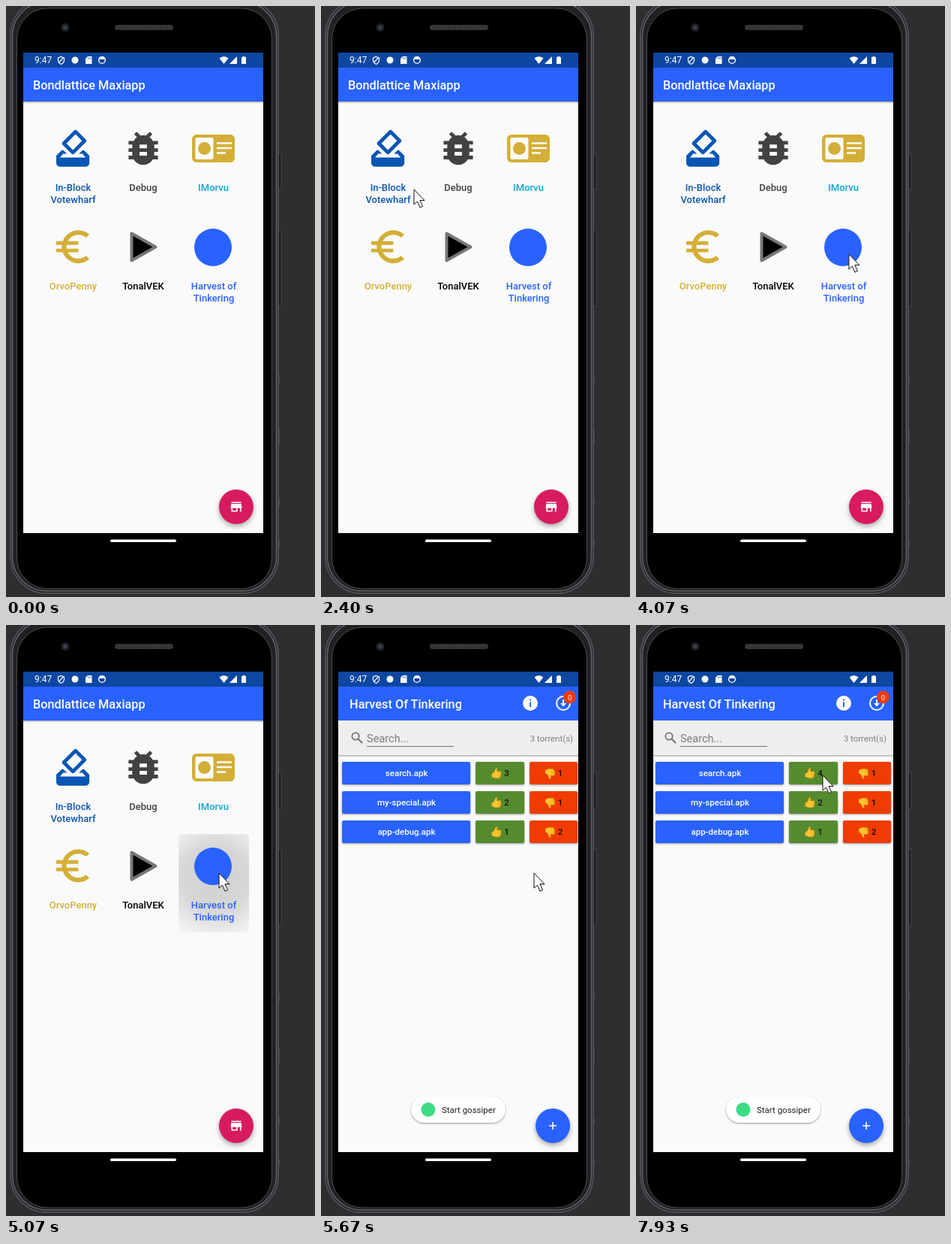
Recreate the animation shown at these times as an HTML page. Size 412x786 px, loop 8 s.

```html
<!DOCTYPE html>
<html lang="en">
<head>
<meta charset="utf-8">
<title>Phone demo</title>
<style>
  html, body { margin: 0; width: 100%; height: 100%; overflow: hidden; background: #2d2e30; }
  svg { display: block; width: 412px; height: 786px; font-family: Roboto, sans-serif; }
  .title { font-size: 16.3px; font-weight: 500; fill: #fff; }
  .label { font-size: 13px; font-weight: 500; text-anchor: middle; }
  .button { font-size: 11.5px; font-weight: 500; text-anchor: middle; }
  .lift { filter: drop-shadow(0 3px 3px #0005); }
  .low { filter: drop-shadow(0 1px 1px #0006); }
</style>
</head>
<body>
<svg viewBox="0 0 412 786">
  <defs>
    <clipPath id="screen"><path d="M23 62H343V701H23Z"/></clipPath>
    <clipPath id="voteClip"><rect x="204" y="182" width="65" height="30" rx="2"/></clipPath>
    <radialGradient id="glow" gradientUnits="userSpaceOnUse" cx="280" cy="337" r="90">
      <stop stop-opacity=".17"/><stop offset=".5" stop-opacity=".14"/><stop offset="1" stop-opacity="0"/>
    </radialGradient>
    <pattern id="mesh" width="3" height="3" patternUnits="userSpaceOnUse">
      <path d="M0 0H3V3H0Z" fill="#2e2e2e"/><path d="M0 0H1.5V1.5H0Z" fill="#4a4a4a"/>
    </pattern>
    <g id="thumb" stroke="#c88a12" stroke-width=".8" fill="#ffc52e">
      <path d="M1 13 6 10 10 1q3-1 3 2l-1 5h8q3 1 1 4 2 2 0 4 1 2-1 4 0 3-3 3H9L1 20Z"/>
      <path d="M14 12h7M14 16h7M14 20h6" fill="none"/>
    </g>
  </defs>

  <!-- phone body -->
  <path d="M363 196h4v48h-4zM363 298h4v102h-4z" fill="#1c1d1f" stroke="#46484b"/>
  <path d="M364.500 490v11M364.500 563v20M364.500 655v10M364.500 710v9" stroke="#46484b"/>
  <rect x="6" y="-9" width="357" height="790" rx="48" fill="#202123" stroke="#4b4d51" stroke-width="2"/>
  <rect x="8.500" y="-6" width="352" height="784" rx="46" fill="none" stroke="#64676c" stroke-width="1.500"/>
  <rect x="14.500" y="3" width="340" height="772" rx="41" stroke="#4a4c4f"/>
  <circle cx="79" cy="28.500" r="5.500" fill="#202226"/>
  <circle cx="79" cy="28.500" r="2.500" fill="#3a4150"/>
  <rect x="145" y="25" width="78" height="7" rx="3.500" fill="url(#mesh)"/>
  <rect x="139" y="709.500" width="88" height="3.500" rx="1.750" fill="#fff"/>

  <g clip-path="url(#screen)">
    <path d="M23 62H343V701H23Z" fill="#fafafa"/>

    <g id="home">
      <path d="M-40 82H420V127H-40Z" fill="#2962ff" class="low"/>
      <text x="36" y="111" class="title">Bondlattice Maxiapp</text>
      <rect id="cellGlow" x="230" y="278" width="94" height="131" rx="3" fill="url(#glow)"/>
      <path transform="translate(59.700 159.800) scale(2.450)" fill="#0a56b4" d="M18 13h-.68l-2 2h1.910L19 17H5l1.780-2h2.050l-2-2H6l-3 3v4c0 1.100.89 2 1.990 2H19c1.100 0 2-.89 2-2v-4l-3-3zm-1-5.050l-4.950 4.950-3.540-3.540 4.950-4.950L17 7.950zm-4.240-5.660L6.390 8.660c-.39.39-.39 1.020 0 1.410l4.950 4.950c.39.39 1.020.39 1.410 0l6.360-6.360c.39-.39.39-1.020 0-1.410L14.160 2.300c-.38-.4-1.010-.4-1.400-.01z"/>
      <path transform="translate(153.600 159.800) scale(2.450)" fill="#424242" d="M20 8h-2.810c-.45-.78-1.070-1.450-1.820-1.960L17 4.410 15.590 3l-2.170 2.170C12.960 5.060 12.490 5 12 5c-.49 0-.96.06-1.410.17L8.410 3 7 4.410l1.620 1.630C7.880 6.550 7.260 7.220 6.810 8H4v2h2.090c-.05.33-.09.66-.09 1v1H4v2h2v1c0 .34.04.67.09 1H4v2h2.810c1.040 1.790 2.970 3 5.190 3s4.150-1.210 5.190-3H20v-2h-2.090c.05-.33.09-.66.09-1v-1h2v-2h-2v-1c0-.34-.04-.67-.09-1H20V8zm-6 8h-4v-2h4v2zm0-4h-4v-2h4v2z"/>
      <rect x="248" y="171" width="57" height="37" rx="6" fill="#d4af37"/>
      <rect x="252.500" y="175" width="24" height="29" rx="2" fill="#fafafa"/>
      <circle cx="264.500" cy="189.500" r="8.500" fill="#d4af37"/>
      <path d="M281 182.500h20M281 189h20M281 195.500h12" stroke="#fafafa" stroke-width="2.500"/>
      <path transform="translate(59.700 290.800) scale(2.450)" fill="#d4af37" d="M15 18.500c-2.510 0-4.680-1.420-5.760-3.500H15v-2H8.580c-.05-.33-.08-.66-.08-1s.03-.67.08-1H15V9H9.240C10.320 6.920 12.500 5.500 15 5.500c1.610 0 3.090.59 4.230 1.570L21 5.300C19.410 3.870 17.300 3 15 3c-3.920 0-7.240 2.510-8.480 6H3v2h3.060c-.04.33-.06.66-.06 1s.02.67.06 1H3v2h3.520c1.240 3.490 4.560 6 8.480 6 2.310 0 4.410-.87 6-2.300l-1.780-1.770c-1.130.98-2.600 1.570-4.220 1.570z"/>
      <path d="M167.500 302.500 199.500 320.500 167.500 338.500Z" stroke="#777" stroke-width="4" stroke-linejoin="round"/>
      <circle cx="276" cy="321" r="25" fill="#2962ff"/>
      <g id="labels"></g>
      <circle cx="307" cy="666" r="23" fill="#d81b60" class="lift"/>
      <path transform="translate(297.200 656.200) scale(.82)" fill="#fff" d="M20 4H4v2h16V4zm1 10v-2l-1-5H4l-1 5v2h1v6h10v-6h4v6h2v-6h1zm-9 4H6v-4h6v4z"/>
    </g>

    <g id="list">
      <path d="M-40 82H420V701H-40Z" fill="#fafafa"/>
      <path d="M-40 127H420V173H-40Z" fill="#eee" class="low"/>
      <path d="M-40 82H420V127H-40Z" fill="#2962ff"/>
      <text x="36" y="111" class="title">Harvest Of Tinkering</text>
      <circle cx="277" cy="104" r="10" fill="#fff"/>
      <path d="M277 98.500v2M277 102.500v6.500" stroke="#2962ff" stroke-width="2"/>
      <circle cx="321" cy="104" r="9" fill="none" stroke="#fff" stroke-width="2"/>
      <path d="M320 99h2v5h3l-4 4.500-4-4.500h3z" fill="#fff"/>
      <circle cx="329.500" cy="96" r="8.500" fill="#f03a08"/>
      <text x="329.500" y="99.500" font-size="9.500" fill="#fff" text-anchor="middle">0</text>
      <g fill="none" stroke="#757575">
        <circle cx="44" cy="148" r="4.700" stroke-width="1.800"/>
        <path d="M47.500 151.500 53 157" stroke-width="2"/>
        <path d="M59 161.500H175"/>
      </g>
      <text x="59" y="156" font-size="14.500" fill="#7d7d7d">Search...</text>
      <text x="334" y="155" font-size="11.500" fill="#808080" text-anchor="end">3 torrent(s)</text>
      <g id="rows"></g>
      <g clip-path="url(#voteClip)"><circle id="voteGlow" cx="249" cy="200" fill="#fff"/></g>
      <circle cx="307" cy="666" r="23" fill="#2962ff" class="lift"/>
      <path d="M302 666h10M307 661v10" stroke="#fff" stroke-width="1.600"/>
    </g>

    <!-- status bar -->
    <path d="M23 62H343V82H23Z" fill="#0d47a1"/>
    <g fill="#fff">
      <text x="38" y="76" font-size="12">9:47</text>
      <path d="M73.500 67.500 77.500 69v3q0 3.500-4 5.500-4-2-4-5.500v-3zM71 75l5-6" fill="none" stroke="#fff" stroke-width="1.200"/>
      <circle cx="92" cy="72" r="4.500"/>
      <path d="M109 67h5.500v10h-8.500v-7z"/>
      <path d="M109.500 68.500v2M111.300 68.500v2M113 68.500v2" stroke="#0d47a1" stroke-width=".8"/>
      <circle cx="128" cy="72" r="4.400" fill="none" stroke="#fff" stroke-width="1.400"/>
      <path d="M124 71q0-4 4-4t4 4z"/>
      <path d="M284.500 69.500q6-4.500 12 0l-6 7.500z"/>
      <path d="M308 67v10h-10z"/>
      <path d="M315.500 67h3v1h1.500v9h-6v-9h1.500z"/>
    </g>

    <g id="toast">
      <rect x="120" y="627" width="126" height="35" rx="17.500" fill="#fff" class="low"/>
      <circle cx="143" cy="644.500" r="9.500" fill="#3ddc84"/>
      <text x="161" y="649" font-size="11.500" fill="#202124">Start gossiper</text>
    </g>
  </g>

  <path id="cursor" d="M0 0V20L4.500 16 8 24 11.500 22.500 8 14.500H14Z" fill="#fff" stroke="#111" stroke-linejoin="round"/>
</svg>
<script>
const $ = id => document.getElementById(id);
const clamp = v => Math.max(0, Math.min(1, v));
const ramp = (t, from, to) => clamp((t - from) / (to - from));

$('labels').innerHTML = [
  [89.5, 246, '#0a56b4', 'In-Block', 'Votewharf'],
  [183, 246, '#424242', 'Debug'],
  [276.5, 246, '#12a5d4', 'IMorvu'],
  [89.5, 377, '#d4af37', 'OrvoPenny'],
  [183, 377, '#000', 'TonalVEK'],
  [277, 377, '#2962ff', 'Harvest of', 'Tinkering'],
].map(([x, y, color, ...lines]) => lines.map((line, i) =>
  `<text class="label" x="${x}" y="${y + i * 15.5}" fill="${color}">${line}</text>`).join('')).join('');

const box = (x, y, w, color) =>
  `<rect class="low" x="${x}" y="${y}" width="${w}" height="30" rx="2" fill="${color}"/>`;
const caption = (x, y, color, text) =>
  `<text class="button" x="${x}" y="${y + 19}" fill="${color}">${text}</text>`;

$('rows').innerHTML = [['search.apk', 3, 1], ['my-special.apk', 2, 1], ['app-debug.apk', 1, 2]]
  .map(([file, up, down], i) => {
    const y = 182 + i * 39;
    return box(26, y, 171, '#2962ff') + caption(112, y, '#fff', file)
      + box(204, y, 65, '#558b2f') + caption(245.5, y, '#111', up)
      + `<use href="#thumb" transform="translate(225 ${y + 8}) scale(.6)"/>`
      + box(276, y, 64, '#f03c02') + caption(317, y, '#111', down)
      + `<use href="#thumb" transform="translate(296.500 ${y + 23}) scale(.6 -.6)"/>`;
  }).join('');
const votes = $('rows').querySelectorAll('text')[1];

// Pointer route: time, x, y
const route = [
  [0, 425, 800], [70, 398, 768], [200, 358, 680], [400, 300, 545], [600, 259, 455], [800, 244, 427],
  [1070, 244, 427], [1200, 213, 408], [1270, 230, 396], [1333, 251, 389], [1400, 251, 388],
  [1540, 251, 388], [1670, 310, 375], [1800, 376, 430], [1930, 330, 510], [2070, 240, 518],
  [2200, 160, 420], [2330, 124, 290], [2400, 124, 244],
  [2530, 121, 300], [2670, 150, 400], [2800, 200, 424], [2930, 250, 370], [3000, 256, 358],
  [3200, 256, 358], [3400, 268, 358], [3530, 325, 350], [3600, 336, 332], [3730, 295, 315],
  [3870, 229, 328], [3970, 255, 350], [4067, 284, 330],
  [5860, 284, 330], [6070, 268, 260], [6330, 249, 200], [8000, 249, 200],
];
function pointer(t) {
  const i = Math.max(1, route.findIndex(p => p[0] >= t));
  const [t0, x0, y0] = route[i - 1], [t1, x1, y1] = route[i];
  const k = ramp(t, t0, t1);
  return [x0 + (x1 - x0) * k, y0 + (y1 - y0) * k];
}

// Two-part curve: quick start, very slow finish
const bezier = (a, b, c, d, s) =>
  a * (1 - s) ** 3 + 3 * b * s * (1 - s) ** 2 + 3 * c * s * s * (1 - s) + d * s ** 3;
function slowFinish(k) {
  const early = k < 1 / 6;
  const xs = early ? [0, .05, .1333, 1 / 6] : [1 / 6, .2083, .25, 1];
  const ys = early ? [0, 0, .06, .4] : [.4, .82, 1, 1];
  let low = 0, high = 1;
  for (let i = 0; i < 20; i++) {
    const mid = (low + high) / 2;
    if (bezier(...xs, mid) < k) low = mid; else high = mid;
  }
  return bezier(...ys, low);
}

function draw(t) {
  $('cursor').setAttribute('transform', `translate(${pointer(t)})`);

  $('glow').setAttribute('r', 10 + 80 * ramp(t, 4800, 5066) + 50 * ramp(t, 5066, 5300));
  $('cellGlow').setAttribute('opacity', t < 4860 ? 0 : 1 - ramp(t, 5200, 5500));

  const slide = slowFinish(ramp(t, 5464, 5914));
  $('home').setAttribute('transform', `translate(${-32 * slide})`);
  $('list').setAttribute('transform', `translate(${32 * (1 - slide)})`);
  $('list').setAttribute('opacity', ramp(t, 5510, 5595));
  $('toast').setAttribute('opacity', ramp(t, 5530, 5650));

  votes.textContent = t < 7130 ? 3 : 4;
  $('voteGlow').setAttribute('r', 8 + 50 * ramp(t, 7133, 7400));
  $('voteGlow').setAttribute('opacity', .22 * ramp(t, 7133, 7200) * (1 - ramp(t, 7400, 7930)));
}

function tick() {
  const t = performance.now() % 8000;
  draw(Math.floor((t + 4) * .015) / .015 % 8000);
  requestAnimationFrame(tick);
}
tick();
</script>
</body>
</html>
```
